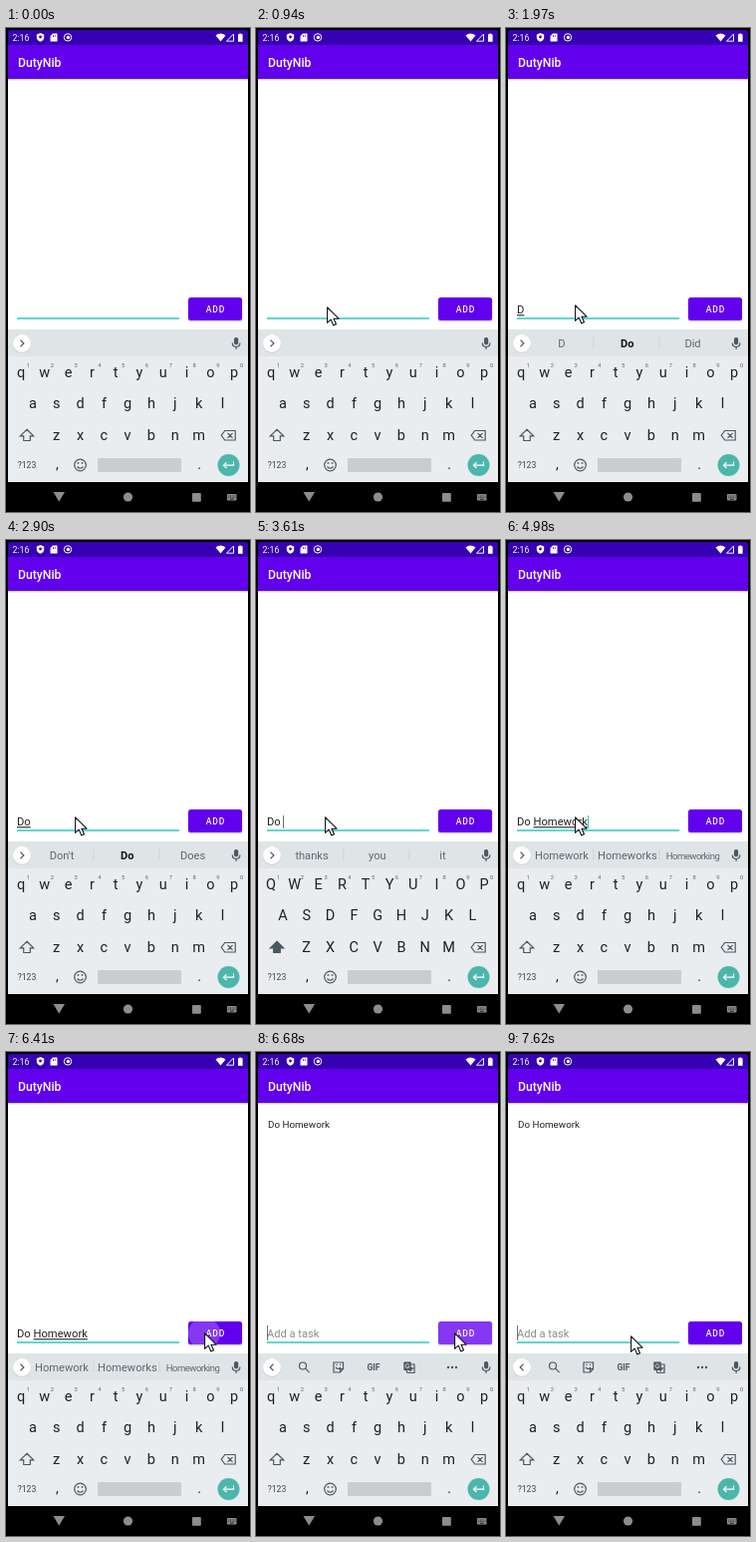
An HTML page that plays this animation: 245 px wide and 485 px high, repeating every 8 s.

```html
<!DOCTYPE html>
<html lang="en">
<head>
<meta charset="utf-8">
<title>Task list</title>
<style>
  html, body { margin: 0; width: 100%; height: 100%; overflow: hidden; background: #000; }
  svg { display: block; width: 245px; height: 485px; font-family: Roboto, "Noto Sans", sans-serif; }
  text { white-space: pre; }
  .mid { text-anchor: middle; }
  .line { fill: none; stroke: #4b585f; stroke-width: 1.2; }
  .mark { text-decoration: underline; }
</style>
</head>
<body>
<svg viewBox="0 0 245 485">
  <defs>
    <clipPath id="face"><rect x="183" y="270" width="54" height="23" rx="2.5"/></clipPath>
    <linearGradient id="shade" x2="0" y2="1">
      <stop stop-color="#000" stop-opacity=".2"/><stop offset="1" stop-color="#000" stop-opacity="0"/>
    </linearGradient>
  </defs>

  <!-- app -->
  <rect x="2" y="2" width="241" height="453" rx="2" fill="#3700b3"/>
  <rect x="2" y="17" width="241" height="34" fill="#6200ee"/>
  <rect x="2" y="51" width="241" height="251" fill="#fff"/>
  <rect x="2" y="51" width="241" height="2" fill="url(#shade)"/>
  <text x="12" y="39" font-size="12.2" font-weight="500" fill="#fff">DutyNib</text>

  <!-- status bar -->
  <g fill="#fff">
    <text x="6.5" y="13" font-size="8.8">2:16</text>
    <path d="M34.5 5l3.7 1.5v2.7q0 3-3.7 4.6q-3.7-1.6-3.7-4.6V6.500z"/>
    <circle cx="34.500" cy="9" r="1.400" fill="#3700b3"/>
    <path d="M47 5.500h4.500v8h-7V8z"/>
    <path d="M47.500 7v2M49.200 7v2" stroke="#3700b3" stroke-width=".7"/>
    <circle cx="62" cy="9.400" r="3.700" fill="none" stroke="#fff" stroke-width="1"/>
    <circle cx="62.400" cy="9.400" r="1.700"/>
    <path d="M210.500 7.500q5-3.800 10 0l-5 6z"/>
    <path d="M228.500 6v7.200h-7z" fill="none" stroke="#fff"/>
    <path d="M233 6.300h1.300v-.9h2v.9h1.300v7.400H233z"/>
  </g>

  <text id="item" x="12" y="75.500" font-size="9.8" fill="#222"></text>
  <rect x="11" y="290.300" width="163" height="1.500" fill="#26cdbd"/>
  <text id="hint" x="11" y="286.300" font-size="11.1" fill="#8c8c8c">Add a task</text>
  <text id="entry" x="11" y="286.300" font-size="11.2" fill="#212121"><tspan></tspan><tspan class="mark"></tspan></text>
  <rect id="caret" width="1"/>

  <!-- button -->
  <rect x="182.500" y="271" width="55" height="23.500" rx="3" fill="#000" opacity=".16"/>
  <rect x="183" y="270" width="54" height="23" rx="2.500" fill="#6200ee"/>
  <circle id="ripple" cx="199" cy="282" fill="#fff" opacity=".22" clip-path="url(#face)"/>
  <text class="mid" x="210.400" y="285" font-size="8.600" font-weight="500" letter-spacing=".75" fill="#fff">ADD</text>

  <!-- keyboard -->
  <rect x="2" y="302" width="241" height="153" fill="#e9edf0"/>
  <rect x="2" y="302" width="241" height="27" fill="#dfe4e7"/>
  <circle cx="16" cy="316.400" r="9.300" fill="#000" opacity=".1"/>
  <circle cx="16" cy="316" r="9" fill="#fff"/>
  <path id="chevron" class="line" stroke-width="1.400"/>
  <g fill="#4b585f">
    <rect x="229" y="310" width="4.200" height="7.500" rx="2.100"/>
    <path class="line" d="M227.300 315.500q0 4 3.800 4t3.800-4M231.100 319.500v2.500"/>
  </g>
  <g id="tips" fill="#5b686e" class="mid"></g>
  <g id="tools">
    <circle class="line" cx="47" cy="314.500" r="3.500"/>
    <path class="line" d="M49.600 317.100l4 4" stroke-width="1.500"/>
    <path class="line" d="M78 311h9.500v6.500l-3 3.500H78zM84.500 321v-3.500h3M80 316q2.500 3 5 0"/>
    <path d="M80.500 313.300h1.200M84 313.300h1.200" stroke="#4b585f" stroke-width="1.200"/>
    <text class="mid" x="118" y="319" font-size="8.600" font-weight="700" fill="#4b585f">GIF</text>
    <rect x="148.300" y="310.500" width="7.500" height="8.500" rx="1" fill="#4b585f"/>
    <path class="line" d="M156 313h3v8.500h-7l-1-2.500M154.500 317h4M156.500 316v1q-.5 2-2 3" stroke-width=".9"/>
    <path d="M153.800 313.700a2 2 0 1 0 .2 1.500h-1.700" fill="none" stroke="#dfe4e7" stroke-width=".9"/>
    <g fill="#4b585f"><circle cx="193" cy="316" r="1.200"/><circle cx="197" cy="316" r="1.200"/><circle cx="201" cy="316" r="1.200"/></g>
  </g>
  <g id="keys" class="mid" font-size="14.5" fill="#182227"></g>
  <path id="shift" class="line" d="M21 402.300l6.700 6.500h-3.400v4.700h-6.600v-4.700h-3.400z"/>
  <path class="line" d="M219.800 403.500h10.400v9.500h-10.400l-3.600-4.750zM222.500 405.800l5 5M227.500 405.800l-5 5"/>
  <text class="mid" x="21" y="441" font-size="8.600" fill="#37444a">?123</text>
  <text class="mid" x="51.500" y="441.500" font-size="14" fill="#182227">,</text>
  <text class="mid" x="194" y="441.500" font-size="14" fill="#182227">.</text>
  <circle class="line" cx="74.500" cy="438" r="5.800"/>
  <path class="line" d="M71.500 439.500q3 3.500 6 0"/>
  <path d="M71.600 436h1.700M75.700 436h1.700" stroke="#4b585f" stroke-width="1.700"/>
  <rect x="92" y="431" width="84" height="14" rx="1.200" fill="#c8cdd0"/>
  <circle cx="223.500" cy="438" r="11" fill="#4db6ac"/>
  <path class="line" d="M228.500 434.500v3.700h-9.800M221.500 435.200l-3 3 3 3" style="stroke:#fff"/>

  <!-- navigation bar -->
  <g fill="#8d8d8d">
    <path d="M47.500 465h11.500l-5.750 9.500z"/>
    <circle cx="122.500" cy="470" r="4.600"/>
    <rect x="187" y="466" width="8.800" height="8.800" rx=".8"/>
    <rect x="222" y="467" width="9.500" height="6.500" rx=".8"/>
    <path d="M223.200 469h7.200M223.200 470.700h7.200" stroke="#000" stroke-width=".7" stroke-dasharray="1 .7"/>
    <path d="M224.700 472.300h4" stroke="#000" stroke-width=".7"/>
  </g>

  <path id="handle" d="M11.500 289.500l4.300 4.300a6 6 0 1 1-8.600 0z" fill="#1fcfbd"/>
  <path id="mouse" d="M.6.800V16.400L4.200 13.100 6.800 19 9.500 17.800 7 12.200H12z" fill="#fff" stroke="#111" stroke-width="1.100" stroke-linejoin="round"/>
</svg>

<script>
const LOOP = 8000;
const $ = id => document.getElementById(id);

function add(parent, tag, attrs, text = '') {
  const el = document.createElementNS('http://www.w3.org/2000/svg', tag);
  for (const name in attrs) el.setAttribute(name, attrs[name]);
  el.textContent = text;
  return parent.appendChild(el);
}

const show = (el, on) => { el.style.display = on ? '' : 'none'; };

// Each step changes only the named parts; everything else carries over.
// done = settled text, word = underlined word, caret: 0 off, 1 on
const steps = [
  [0, { done: '', word: '', tips: [], caret: 0, raised: 1, handle: 0, caps: 0,
        mouse: null, ripple: 0, hint: 0, item: '', tools: 0 }],
  [280, { caret: 1 }],
  [550, { mouse: [58, 420] }],
  [670, { mouse: [65, 362] }],
  [790, { mouse: [69, 304], caret: 0 }],
  [940, { mouse: [71, 279] }],
  [1090, { mouse: [69, 277], caret: 1 }],
  [1240, { handle: 1 }],
  [1360, { caret: 0 }],
  [1510, { word: 'D', tips: ['D', '*Do', 'Did'], caret: 1, raised: 0 }],
  [1660, { handle: 0 }],
  [1970, { caret: 0 }],
  [2370, { word: 'Do', tips: ["Don't", '*Do', 'Does'], caret: 1 }],
  [2900, { caret: 0 }],
  [3300, { done: 'Do ', word: '', tips: ['thanks', 'you', 'it'], caret: 1 }],
  [3610, { caps: 1 }],
  [3760, { word: 'H', tips: ['H', '*He', 'Had'], caps: 0 }],
  [4160, { caret: 0 }],
  [4310, { word: 'Ho', tips: ['Ho', '*How', 'Hope'], caret: 1 }],
  [4430, { word: 'Home', tips: ['Home', 'Homes', 'Homework'] }],
  [4550, { word: 'Homew', tips: ['Homew', '*Homework', 'Homeworking'] }],
  [4670, { word: 'Homewor', tips: ['Homewor', '*Homework', 'Homeworking'] }],
  [4980, { word: 'Homework', tips: ['Homework', 'Homeworks', 'Homeworking'] }],
  [5410, { caret: 0 }],
  [5840, { caret: 1 }],
  [5990, { mouse: [132, 290] }],
  [6110, { mouse: [199, 298] }],
  [6260, { mouse: [199, 281] }],
  [6410, { ripple: 16, caret: 0 }],
  [6530, { ripple: 34, done: '', word: '', hint: 1, caret: 1 }],
  [6680, { ripple: 60, item: 'Do Homework', tips: [], tools: 1 }],
  [6800, { ripple: 0 }],
  [7110, { mouse: [172, 281], caret: 0 }],
  [7230, { mouse: [136, 282] }],
  [7380, { mouse: [130, 283] }],
  [7500, { mouse: [126, 283] }],
  [7620, { mouse: [125, 284], caret: 1 }],
];

const states = [];
for (const [, change] of steps) states.push({ ...states.at(-1), ...change });

// letter rows: text, first x, baseline
const pitch = 23.8;
const letters = [];
for (const [row, x, y] of [['qwertyuiop', 15, 350], ['asdfghjkl', 27, 381.3], ['zxcvbnm', 50.7, 412.5]]) {
  [...row].forEach((c, i) => {
    letters.push(add($('keys'), 'text', { x: x + i * pitch, y }, c));
    if (row.length === 10) {
      add($('keys'), 'text', { x: 22.5 + i * pitch, y: 340.3, 'font-size': 5.8, fill: '#5b686e' }, (i + 1) % 10);
    }
  });
}

function drawTips(tips) {
  const box = $('tips');
  box.replaceChildren();
  tips.forEach((tip, i) => {
    const bold = tip[0] === '*';
    const word = bold ? tip.slice(1) : tip;
    const long = word.length > 10;
    add(box, 'text', {
      x: [56, 121.8, 187.5][i], y: 320,
      'font-size': long ? 9.5 : 11.1,
      'letter-spacing': long ? -0.5 : 0,
      'font-weight': bold ? 700 : 400,
      fill: bold ? '#111' : '#5b686e',
    }, word);
    if (i) add(box, 'rect', { x: 21.5 + i * 66, y: 310, width: 0.8, height: 11, fill: '#c9cfd2' });
  });
}

function draw(s) {
  const entry = $('entry');
  const [plain, marked] = entry.children;
  plain.textContent = s.done;
  marked.textContent = s.word;
  $('item').textContent = s.item;
  show($('hint'), s.hint);

  const typed = s.done + s.word;
  const caret = $('caret');
  show(caret, s.caret);
  caret.setAttribute('x', typed ? Math.floor(11 + entry.getComputedTextLength() + 0.4) : 11);
  caret.setAttribute('y', s.raised ? 261 : typed ? 276 : 274);
  caret.setAttribute('height', typed ? 13 : 15);
  caret.setAttribute('fill', typed.length > 4 ? '#26cdbd' : '#5f7472');

  drawTips(s.tips);
  show($('tools'), s.tools);
  $('chevron').setAttribute('d', s.tools ? 'M17.5 312.700l-3.300 3.300 3.300 3.300' : 'M14.500 312.700l3.300 3.300-3.300 3.300');
  for (const el of letters) {
    el.textContent = s.caps ? el.textContent.toUpperCase() : el.textContent.toLowerCase();
  }
  $('shift').style.fill = s.caps ? '#4b585f' : 'none';

  $('ripple').setAttribute('r', s.ripple);
  show($('handle'), s.handle);
  show($('mouse'), s.mouse);
  if (s.mouse) $('mouse').setAttribute('transform', `translate(${s.mouse})`);
}

const start = performance.now();
let shown = -1;
function tick() {
  const t = (performance.now() - start) % LOOP;
  const now = steps.findLastIndex(([at]) => at <= t);
  if (now !== shown) draw(states[shown = now]);
  requestAnimationFrame(tick);
}
tick();
</script>
</body>
</html>
```
